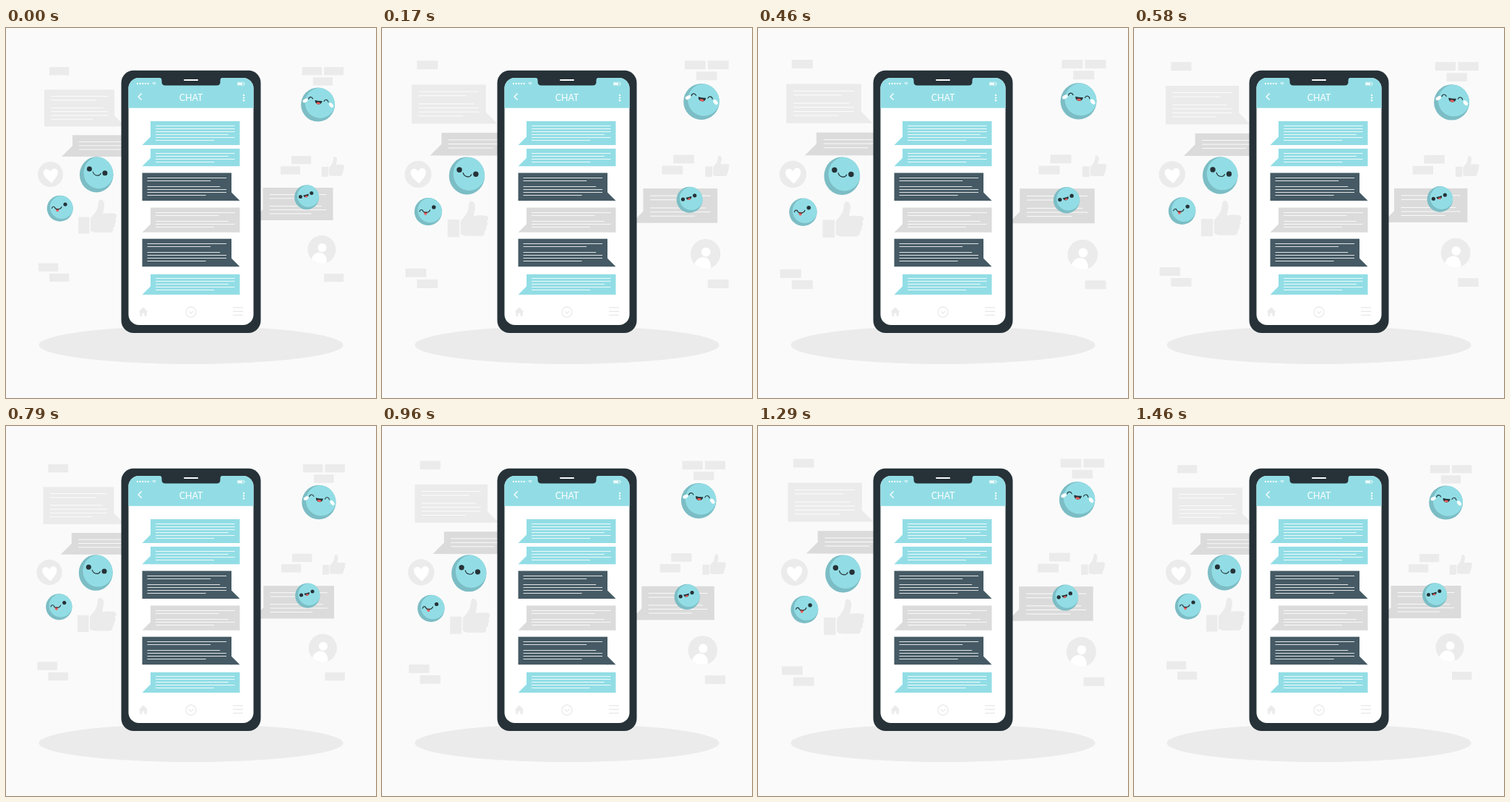
An HTML page with a canvas that plays this animation: 512x512 px, repeating every 1.5 s.

```html
<!DOCTYPE html>
<html lang="en">
<head>
<meta charset="utf-8">
<title>Chat</title>
<style>
html, body { margin: 0; width: 100%; height: 100%; overflow: hidden; background: #fafafa; }
canvas { display: block; width: 512px; height: 512px; }
</style>
</head>
<body>
<canvas id="stage" width="512" height="512"></canvas>
<script>
const ctx = document.getElementById('stage').getContext('2d');
const CYAN = '#92dde5', SHADE = '#7cbdc5', DARK = '#455a64', INK = '#263238';
const PALE = '#ebebeb', GREY = '#dbdbdb', RED = '#ef5e5e', WHITE = '#fff';
const LOOP = 1500, FPS = 24, TAU = Math.PI * 2;

// A double beat: quick rise, slow fall, rise, quick fall.
function pulseAt(ms) {
  const frame = Math.floor((ms % LOOP) * FPS / 1000 + 0.1);
  const beat = (start, peak, end) =>
    Math.max(0, Math.min((frame - start) / (peak - start), (end - frame) / (end - peak)));
  return 1 + 0.1 * (beat(0, 6.75, 20) + beat(20, 28, 35));
}

function rect(x, y, w, h, color) {
  ctx.fillStyle = color;
  ctx.fillRect(x, y, w, h);
}

function roundRect(x, y, w, h, r, color) {
  ctx.beginPath();
  ctx.roundRect(x, y, w, h, r);
  ctx.fillStyle = color;
  ctx.fill();
}

function oval(x, y, rx, ry, color, angle = 0) {
  ctx.beginPath();
  ctx.ellipse(x, y, rx, ry, angle, 0, TAU);
  ctx.fillStyle = color;
  ctx.fill();
}

const dot = (x, y, r, color) => oval(x, y, r, r, color);

function shape(path, color) {
  ctx.fillStyle = color;
  ctx.fill(new Path2D(path));
}

function curve(path, color, width, cap = 'butt') {
  ctx.strokeStyle = color;
  ctx.lineWidth = width;
  ctx.lineCap = cap;
  ctx.stroke(new Path2D(path));
}

function at(x, y, scale, angle, draw) {
  ctx.save();
  ctx.translate(x, y);
  ctx.rotate(angle);
  ctx.scale(scale, scale);
  draw();
  ctx.restore();
}

function clipped(outline, draw) {
  ctx.save();
  ctx.beginPath();
  outline();
  ctx.clip();
  draw();
  ctx.restore();
}

// Rows of dummy text; a gap row ends the first paragraph.
function paragraph(x, y, width, rows, step, gap) {
  const dip = gap ? gap + 1 : rows - 3;
  for (let row = 0; row < rows; row++) {
    if (gap && row === gap) continue;
    const part = row === rows - 1 ? 0.74 : row === gap - 1 ? 0.8 : row === dip ? 0.92 : 1;
    rect(x, y + row * step - 0.42, width * part, 0.84, WHITE);
  }
}

// The tail sits at the lower corner: side -1 is left, 1 is right.
function bubble(x, y, right, bottom, side, tail, color, rows, step, gap) {
  rect(x, y, right - x, bottom - y, color);
  const edge = side < 0 ? x : right;
  shape(`M${edge - side} ${bottom - tail}H${edge}L${edge + side * tail} ${bottom}H${edge - side}Z`, color);
  const inset = tail * 0.61;
  const top = Math.floor((y + bottom) / 2 - (rows - 1) * step / 2) + 0.5;
  paragraph(x + inset, top, right - x - 2 * inset, rows, step, gap);
}

function thumb(x, y, scale) {
  at(x, y, scale, 0, () => {
    rect(-17, 24, 15.5, 23, PALE);
    shape('M0 43V26C4 21 9 16 10 10C11 4 11 0 14 0C19 1 20 6 18.5 12L17 19.5' +
      'C23 18 29 19 33 19Q37 20 36 24Q35 26 34 26.5Q37 29 33.5 33' +
      'Q35 36 31.5 39Q32 45 27 45.5H7Q3 45 0 43Z', PALE);
  });
}

function heartBadge() {
  dot(61.5, 202.5, 17.5, PALE);
  at(62, 203.5, 1, -0.08, () => {
    shape('M0 11C-5 6-10 2-10-4C-10-9-3-11 0-5C3-11 10-9 10-4C10 2 5 6 0 11Z', WHITE);
  });
}

function avatar() {
  dot(437, 306.5, 19.5, PALE);
  clipped(() => ctx.arc(437, 306.5, 19.5, 0, TAU), () => {
    dot(437.5, 304, 6, WHITE);
    oval(433, 323, 10.8, 12.5, WHITE, 0.25);
  });
}

const brick = (x, y) => rect(x, y, 27.2, 11.3, PALE);

function brickPair(x, y, side) {
  brick(x, y);
  brick(x + side * 15, y + 14.3);
}

function backdrop() {
  brick(60, 54);
  brickPair(409.8, 54, 1);
  brick(440, 54);
  brickPair(395, 177, -1);
  brickPair(45, 325.5, 1);
  brick(440, 340);
  bubble(53, 85.3, 150, 136.3, 1, 15, PALE, 7, 5.3, 2);
  bubble(92, 148.3, 189, 178, -1, 15, GREY, 3, 5.3);
  bubble(355.5, 221, 452.5, 266, -1, 15, GREY, 6, 5.3, 2);
  heartBadge();
  avatar();
  thumb(117, 237.5, 1);
  thumb(446.7, 178, 0.59);
}

function ball(x, y, rx, ry) {
  oval(x, y, rx, ry, SHADE);
  clipped(() => ctx.ellipse(x, y, rx, ry, 0, 0, TAU), () =>
    oval(x + rx * 0.13, y - ry * 0.1, rx * 0.89, ry * 0.89, CYAN));
}

function openMouth(x, y, scale, angle) {
  at(x, y, scale, angle, () => {
    shape('M-5-2Q0-1 5-2C5 5-5 5-5-2Z', INK);
    oval(0, 1.7, 2.8, 1.4, RED);
  });
}

const faceLine = path => curve(path, INK, 1.1, 'round');

function faces() {
  ball(125.2, 202.8, 23.3, 24.6);
  dot(115.4, 195.1, 3.5, INK);
  dot(136.9, 200.8, 3.5, INK);
  faceLine('M120.3 199C121.5 204.5 129 206 131.2 201.3');

  ball(431.6, 106, 23.4, 23.6);
  faceLine('M418.6 98.3C419.6 94.5 423.6 95 424.6 98');
  faceLine('M440 101.5C441.500 98 445.500 99 446 102.500');
  openMouth(432.4, 102.4, 1, 0.12);
  oval(414.1, 100.5, 3.8, 2.3, WHITE, -0.5);
  oval(450, 106.7, 3.8, 2.4, WHITE, 0.9);

  ball(74.7, 249.7, 18, 18);
  faceLine('M63.5 249.5C64 246.5 67 246.5 68 249');
  dot(82, 244, 2.6, INK);
  at(71, 250.8, 1, -0.2, () => shape('M-2-1H2V1.5C1.5 4-1.5 4-2 1.5Z', RED));
  faceLine('M68 249.5C71 252 76 251 77 247.5');

  ball(416.1, 234.2, 17, 17);
  dot(407.5, 233.6, 2.5, INK);
  dot(422.8, 228.6, 2.5, INK);
  openMouth(415.3, 231.9, 0.74, -0.25);
}

function statusBar() {
  shape('M212 68.5Q215.5 69 215.5 72.5V74.5Q215.5 79.5 220.5 79.5' +
    'H291.5Q296.5 79.5 296.5 74.5V72.5Q296.5 69 300 68.5Z', INK);
  roundRect(246, 71, 20, 2, 1, WHITE);
  for (let i = 0; i < 5; i++) dot(182 + i * 3.65, 77, 1.15, WHITE);
  curve('M203.8 77.7Q205 76.7 206.2 77.7M202.400 76.500Q205 74.400 207.600 76.500', WHITE, 0.9);
  curve('M320.3 75.3h8.8v3.9h-8.8Z', WHITE, 0.6);
  rect(321, 76, 6, 2.5, WHITE);
  rect(329.6, 76.4, 0.9, 1.7, WHITE);
}

function header() {
  rect(169, 68, 174, 42.7, CYAN);
  statusBar();
  curve('M187.6 90.5L183.1 95L187.6 99.5', WHITE, 1.3);
  for (let i = 0; i < 3; i++) dot(329, 93 + i * 3.6, 1.2, WHITE);
  ctx.fillStyle = WHITE;
  ctx.font = '12.4px Lato, sans-serif';
  ctx.textAlign = 'center';
  ctx.fillText('CHAT', 256, 101.1);
}

function messages() {
  const incoming = (y, bottom, color, rows, gap) =>
    bubble(200, y, 323.5, bottom, -1, 11.5, color, rows, 4, gap);
  const outgoing = y => bubble(188.5, y, 312, y + 38.5, 1, 11.5, DARK, 7, 4, 2);
  incoming(129, 162, CYAN, 6);
  incoming(167, 191.3, CYAN, 4);
  outgoing(200.5);
  incoming(248.5, 282.8, GREY, 6, 2);
  outgoing(291.7);
  incoming(340.8, 369, CYAN, 5);
}

function toolbar() {
  shape('M190 386.3L196.3 392.7H194.8V398.7H191.5V394.7H188.5V398.7H185.2V392.7H183.7Z', PALE);
  ctx.beginPath();
  ctx.arc(256, 393, 7, 0, TAU);
  ctx.strokeStyle = PALE;
  ctx.lineWidth = 1.3;
  ctx.stroke();
  curve('M252.7 391.7L256 395L259.3 391.7', PALE, 1.3);
  for (let i = 0; i < 3; i++) rect(314, 386.2 + i * 5.2, 14, 1.6, PALE);
}

function phone() {
  roundRect(159.5, 58.8, 193, 363.2, 17, INK);
  clipped(() => ctx.roundRect(169.5, 69, 173, 342, 14.5), () => {
    rect(169, 68, 174, 344, WHITE);
    header();
    messages();
    toolbar();
  });
}

function scaledAbout(cy, scale, draw) {
  at(256, cy, scale, 0, () => {
    ctx.translate(-256, -cy);
    draw();
  });
}

const start = performance.now();

function render() {
  const scale = pulseAt(performance.now() - start);
  rect(0, 0, 512, 512, '#fafafa');
  oval(256, 438.7, 210.5, 26.3, PALE);
  scaledAbout(202.5, scale, backdrop);
  scaledAbout(175, scale, faces);
  phone();
  requestAnimationFrame(render);
}
render();
</script>
</body>
</html>
```
